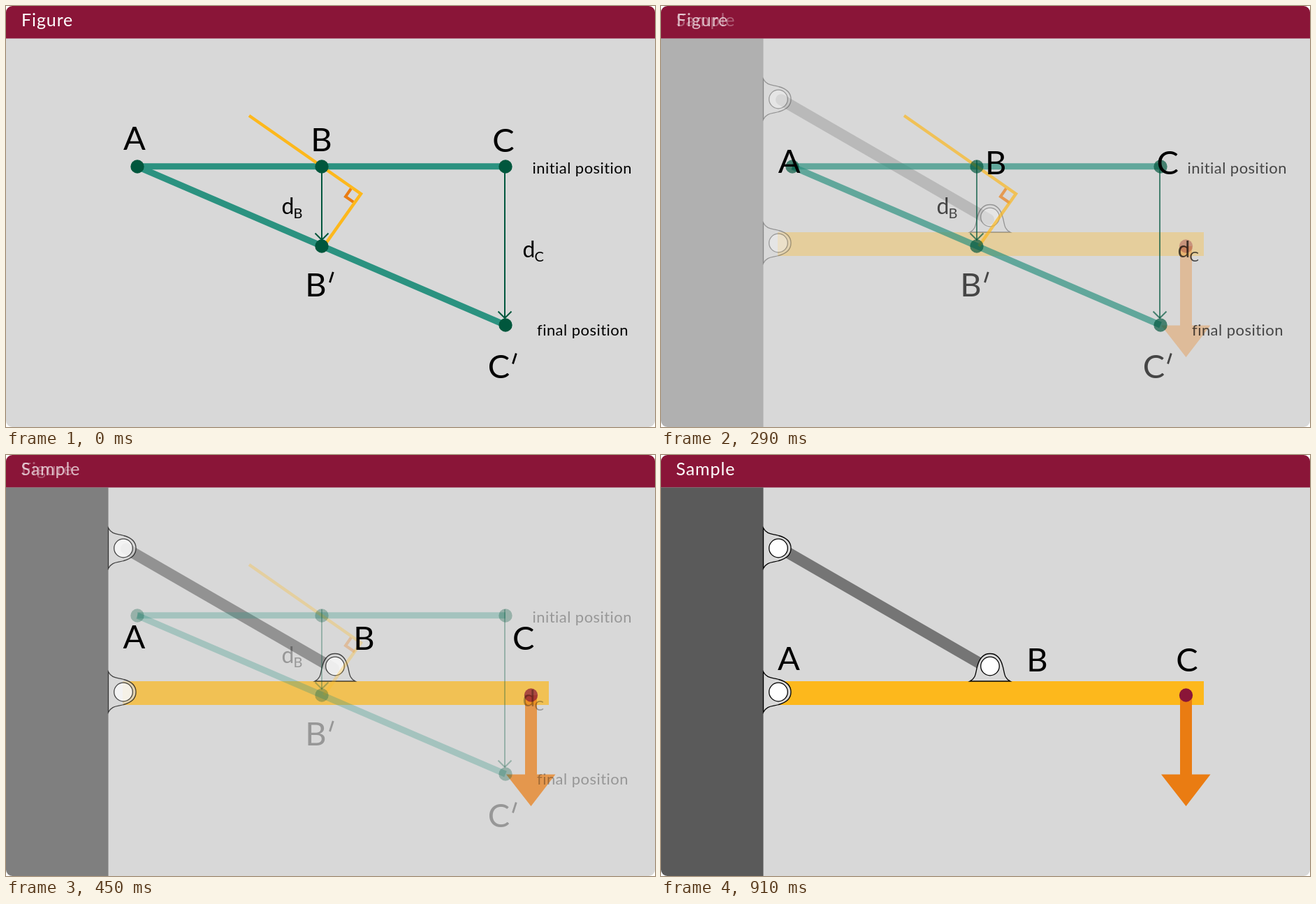
Animation of 929 by 603 pixels, one loop 950 ms. Source, as an HTML page with a canvas:

```html
<!DOCTYPE html>
<html lang="en">
<head>
<meta charset="utf-8">
<title>Figure to sample</title>
<style>
  html, body { margin: 0; width: 100%; height: 100%; overflow: hidden; background: #fff; }
  canvas { display: block; border-radius: 9px; }
</style>
</head>
<body>
<canvas width="929" height="603"></canvas>
<script>
const ctx = document.querySelector('canvas').getContext('2d');
const LOOP = 950, START = 67, DURATION = 790;
const STEPS = [0, 130, 170, 210, 250, 290, 330, 370, 420, 460, 510, 550, 590, 630, 670, 720, 760, 810, 860, 910];
const PAPER = '#d8d8d8', MAROON = '#8a1538', TEAL = '#2b9280', PINE = '#00573d',
      YELLOW = '#fdb81c', ORANGE = '#ea7c12', BLACK = '#000', WHITE = '#fff';

// cubic-bezier(.4, 0, .2, 1), solved by bisection
function ease(x) {
  if (x <= 0 || x >= 1) return x <= 0 ? 0 : 1;
  let lo = 0, hi = 1, s;
  for (let i = 0; i < 24; i++) {
    s = (lo + hi) / 2;
    const bx = 1.2 * s * (1 - s) ** 2 + 0.6 * s * s * (1 - s) + s ** 3;
    if (bx < x) lo = s; else hi = s;
  }
  return s * s * (3 - 2 * s);
}

function rect(x, y, w, h, color) {
  ctx.fillStyle = color;
  ctx.fillRect(x, y, w, h);
}

function line(color, width, points, cap = 'butt') {
  ctx.strokeStyle = color;
  ctx.lineWidth = width;
  ctx.lineCap = cap;
  ctx.beginPath();
  points.forEach(([x, y]) => ctx.lineTo(x, y));
  ctx.stroke();
}

function dot(x, y, r, color) {
  ctx.fillStyle = color;
  ctx.beginPath();
  ctx.arc(x, y, r, 0, 2 * Math.PI);
  ctx.fill();
}

function text(str, x, y, size, { color = BLACK, spacing = 0, align = 'left' } = {}) {
  ctx.font = `${size}px Lato, sans-serif`;
  ctx.letterSpacing = spacing + 'px';
  ctx.textAlign = align;
  ctx.fillStyle = color;
  ctx.fillText(str, x, y);
}

const letter = (str, x, y) => text(str, x, y, 47, { align: 'center' });

function primed(str, x, y) {
  letter(str, x, y);
  line(BLACK, 2.8, [[x + 24.8, y - 35], [x + 20, y - 20]]);
}

function distance(sub, x, y) {
  text('d', x, y, 32);
  text(sub, x + 17, y + 5.5, 20);
}

function thinArrow(x, y1, y2) {
  line(PINE, 2, [[x, y1], [x, y2]]);
  line(PINE, 2, [[x - 9.5, y2 - 9.5], [x, y2], [x + 9.5, y2 - 9.5]]);
}

function bracket(x, y, angle) {
  ctx.save();
  ctx.translate(x, y);
  ctx.rotate(angle);
  ctx.beginPath();
  ctx.moveTo(-29, 0);
  ctx.bezierCurveTo(-19, -5, -21, -13, -18, -22);
  ctx.bezierCurveTo(-15, -33, -9, -39.5, 0, -39.5);
  ctx.bezierCurveTo(9, -39.5, 15, -33, 18, -22);
  ctx.bezierCurveTo(21, -13, 19, -5, 29, 0);
  ctx.closePath();
  ctx.fillStyle = PAPER;
  ctx.fill();
  ctx.strokeStyle = BLACK;
  ctx.lineWidth = 1.3;
  ctx.stroke();
  dot(0, -21.5, 13.3, WHITE);
  ctx.stroke();
  ctx.restore();
}

function drawSample() {
  rect(0, 46.5, 146.5, 557, '#5a5a5a');
  line('#757575', 16, [[172, 134.2], [469, 305.7]], 'round');
  rect(167, 324, 610, 34, YELLOW);
  bracket(146.5, 133.5, Math.PI / 2);
  bracket(146.5, 339.5, Math.PI / 2);
  bracket(471, 324, 0);
  ctx.fillStyle = ORANGE;
  ctx.beginPath();
  [[743, 344], [760, 344], [760, 457.5], [786.5, 457.5], [751.5, 503], [716, 457.5], [743, 457.5]]
    .forEach(([x, y]) => ctx.lineTo(x, y));
  ctx.fill();
  dot(751.5, 344, 9.7, MAROON);
  text('Sample', 21.5, 29, 25, { color: WHITE, spacing: 0.9 });
}

function drawFigure() {
  line(TEAL, 9, [[188, 229.7], [715, 229.7]]);
  line(TEAL, 9, [[188, 230], [715, 457]]);
  line(ORANGE, 4, [[494, 261.5], [486, 273], [499, 282]]);
  line(YELLOW, 4.5, [[348, 157], [508, 269], [455, 344]]);
  [[188, 230], [452, 230], [715, 230], [452, 344], [715, 457]]
    .forEach(([x, y]) => dot(x, y, 9.7, PINE));
  thinArrow(452, 221, 335);
  thinArrow(714, 221, 447);
  primed('B', 443.5, 416);
  primed('C', 705.5, 532.5);
  distance('B', 394.5, 298);
  distance('C', 739.5, 360);
  text('initial position', 753.5, 239.5, 22, { spacing: 0.45 });
  text('final position', 760, 472, 22, { spacing: 0.45 });
  text('Figure', 22, 29, 25, { color: WHITE, spacing: 0.9 });
}

function draw(time) {
  const held = STEPS.findLast(step => step <= time);
  const p = held ? ease((held - START) / DURATION) : 0;
  ctx.globalAlpha = 1;
  rect(0, 0, 929, 603, PAPER);
  rect(0, 0, 929, 46.5, MAROON);
  ctx.globalAlpha = p;
  drawSample();
  ctx.globalAlpha = 1 - p;
  drawFigure();
  ctx.globalAlpha = 1;
  letter('A', 184 - p, 206 + 102 * p);
  letter('B', 451.5 + 87 * p, 208 + 102 * p);
  letter('C', 712 + 41 * p, 208.5 + 101.5 * p);
}

function tick() {
  draw(performance.now() % LOOP);
  requestAnimationFrame(tick);
}
tick();
</script>
</body>
</html>
```
